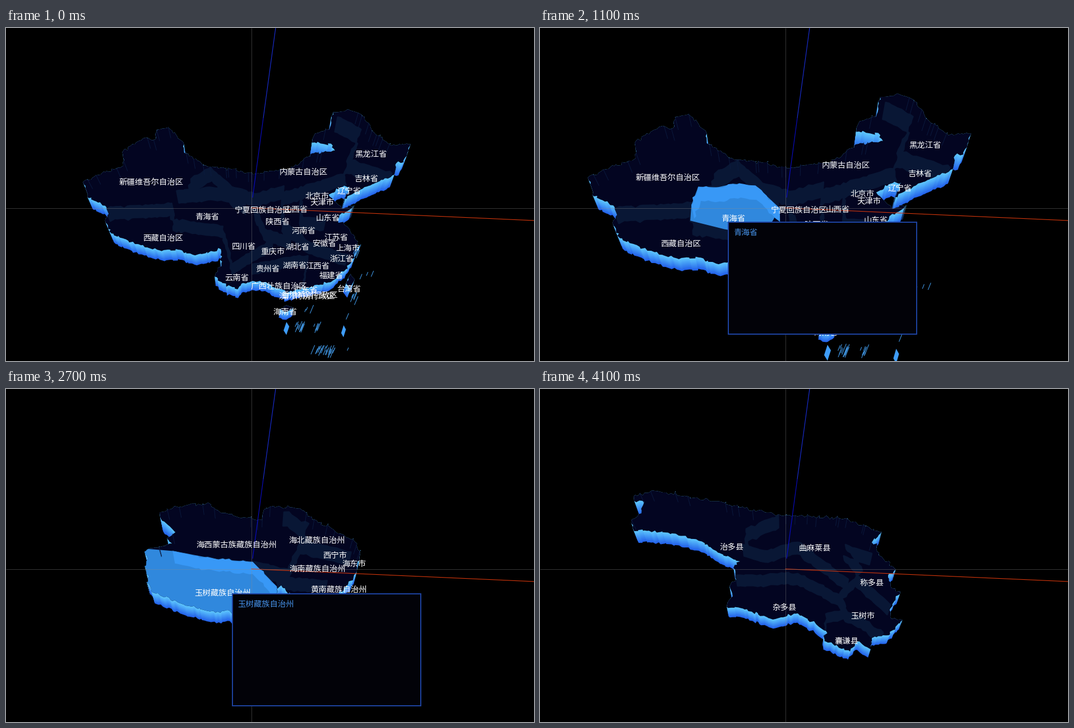
Animation of 942 by 595 pixels, one loop 4800 ms. Source, as a matplotlib script:

```python
import numpy as np
import matplotlib.pyplot as plt
from matplotlib.animation import FuncAnimation
from matplotlib.collections import LineCollection, PolyCollection
from matplotlib.patches import Polygon, Rectangle

W, H, DPI = 942, 595, 100
PX = 72 / DPI
CENTER = np.array([437.5, 321.5])
PERSPECTIVE = 0.0005
FONT = dict(family="Noto Sans CJK JP", fontsize=14.4 * PX, va="baseline")
TOP, BAND = "#030521", "#091735"
HOT, HOT_BAND = "#3088dd", "#3898f6"
WALL_LOW, WALL_HIGH = np.array([.14, .39, .92]), np.array([.38, .80, 1])
LAYERS = 16


def rough(points, amp=1.5, step=4, closed=True):
    """Subdivide a line and jitter it like a coast."""
    pts = np.array(points, float)
    rng = np.random.default_rng(len(pts))
    ends = np.roll(pts, -1, axis=0) if closed else pts[1:]
    out = []
    for a, b in zip(pts, ends):
        n = max(1, int(np.hypot(*(b - a)) / step))
        line = a + np.linspace(0, 1, n, endpoint=False)[:, None] * (b - a)
        line[1:] += rng.normal(0, amp, (n - 1, 2))
        out.extend(line)
    if not closed:
        out.append(pts[-1])
    return np.array(out)


def sink(points, depth):
    """Move points from the top face down to the base."""
    return CENTER + (points - CENTER) * 0.97 + [0, depth]


def band(line, depth):
    line = rough(line, 1.2, 6, closed=False)
    return np.vstack([line, sink(line, depth)[::-1]])


def leaf(x, y, w, h):
    """Slanted diamond used for islands."""
    return np.array([(x - w, y + h * .3), (x, y - h), (x + w, y - h * .3), (x, y + h)])


def north_ticks(outline, depth):
    """Thin wall edges that show along the northern border."""
    rng = np.random.default_rng(4)
    heading = np.roll(outline, -1, axis=0) - outline
    north = outline[(heading[:, 0] > 0) & (outline[:, 1] < 300)]
    picked = north[rng.random(len(north)) < .22]
    return [np.array([p - [0, 1.5], sink(p, depth * .7)]) for p in picked]


def sea_slivers():
    rng = np.random.default_rng(11)
    # x, y, spread, count
    clusters = [(540, 572, 5, 14), (573, 577, 4, 9), (655, 412, 3, 10), (590, 625, 20, 26),
                (652, 508, 4, 5), (656, 512, 1, 1), (675, 466, 8, 3), (637, 549, 1, 1),
                (556, 535, 6, 3)]
    lines = []
    for x, y, spread, count in clusters:
        for _ in range(count):
            px, py = rng.normal((x, y), (spread, 4))
            size = rng.uniform(6, 20)
            lines.append([(px, py + size / 2), (px + size * .4, py - size / 2)])
    return np.array(lines)


def make_map(end, ref, depth, outline, bands, labels, regions, islets=(), slivers=()):
    shape = rough(outline)
    return dict(end=end, ref=ref, depth=depth, shape=shape, labels=labels,
                bands=[band(b, depth) for b in bands],
                ticks=north_ticks(shape, depth),
                regions={name: (np.array(edge + rest, float), band(edge, depth))
                         for name, (edge, rest) in regions.items()},
                islets=[rough(i, .8) for i in islets], slivers=slivers)


XJ, QH = "新疆维吾尔自治区", "青海省"
HX, XN, YS = "海西蒙古族藏族自治州", "西宁市", "玉树藏族自治州"
ZD = "杂多县"

north = [(89, 268), (116, 254), (173, 234), (174, 203), (215, 178), (240, 180), (243, 162),
         (267, 156), (297, 185), (299, 207), (347, 236), (380, 238), (440, 251), (519, 240),
         (562, 209), (610, 203), (602, 189), (563, 187), (569, 168), (598, 160), (605, 125),
         (640, 121), (664, 130), (690, 166), (726, 193), (766, 190), (752, 227)]
east = [(737, 229), (733, 253), (684, 275), (630, 301), (642, 277), (630, 275), (598, 294),
        (625, 322), (653, 316), (614, 345), (637, 360), (660, 391), (654, 426), (632, 455),
        (604, 478), (516, 499), (487, 489), (456, 475)]
west = [(417, 481), (409, 493), (376, 478), (360, 466), (375, 437), (374, 408), (320, 421),
        (285, 409), (250, 412), (215, 404), (146, 375), (133, 348), (141, 334), (134, 317),
        (100, 301)]
COUNTRY = make_map(
    5.5, .989, 24, north + east + west,
    bands=[[(135, 325), (150, 320), (272, 313)],
           [(272, 312), (270, 345), (378, 360), (396, 440), (482, 388)],
           [(283, 286), (345, 279), (385, 283), (425, 310)],
           [(308, 275), (320, 255), (354, 238), (397, 278), (450, 292), (505, 276)],
           [(505, 290), (640, 248), (635, 225), (663, 160), (615, 135)],
           [(640, 222), (728, 250)],
           [(440, 300), (465, 365), (520, 384)],
           [(502, 296), (506, 350), (562, 395), (640, 420)],
           [(540, 305), (546, 342), (592, 344)],
           [(440, 440), (500, 428), (556, 422), (550, 472)]],
    labels=[(XJ, 230, 267), ("西藏自治区", 253, 384), (QH, 346, 339),
            ("宁夏回族自治区", 462, 325), ("内蒙古自治区", 545, 246), ("黑龙江省", 684, 209),
            ("吉林省", 675, 260), ("辽宁省", 640, 286), ("北京市", 574, 296),
            ("天津市", 585, 308), ("山西省", 530, 324), ("陕西省", 493, 350),
            ("山东省", 597, 342), ("河南省", 547, 368), ("江苏省", 615, 382),
            ("安徽省", 590, 395), ("上海市", 640, 405), ("浙江省", 627, 427),
            ("湖北省", 534, 402), ("重庆市", 483, 411), ("四川省", 422, 401),
            ("贵州省", 472, 449), ("湖南省", 529, 441), ("江西省", 577, 443),
            ("福建省", 605, 463), ("云南省", 407, 468), ("广西壮族自治区", 496, 485),
            ("广东省", 553, 493), ("香港特别行政区", 561, 505),
            ("澳门特别行政区", 555, 507), ("台湾省", 643, 492), ("海南省", 509, 541)],
    regions={XJ: ([(272, 313), (286, 286)],
                  [(308, 278), (354, 232), (340, 150), (60, 150), (80, 300), (135, 328)]),
             QH: ([(272, 316), (284, 284), (318, 285), (345, 279), (385, 282), (428, 322)],
                  [(415, 345), (378, 368), (330, 359), (270, 344)])},
    islets=[leaf(512, 534, 15, 7), leaf(646, 476, 9, 16)], slivers=sea_slivers())
DIAMONDS = [leaf(512, 577, 6, 14), leaf(633, 583, 5, 13)]

PROVINCE = make_map(
    25, .98, 21,
    [(277, 222), (300, 215), (362, 205), (384, 223), (412, 230), (456, 236), (463, 212),
     (522, 215), (548, 235), (618, 273), (628, 295), (618, 332), (568, 396), (546, 391),
     (512, 372), (490, 350), (482, 357), (490, 396), (473, 416), (420, 420), (399, 394),
     (375, 398), (320, 384), (266, 363), (254, 345), (259, 334), (251, 317), (257, 304),
     (251, 291), (270, 284), (299, 277), (290, 268), (305, 257), (288, 241), (279, 233)],
    bands=[[(300, 290), (380, 305), (440, 309), (502, 322)],
           [(256, 318), (320, 330), (345, 366)],
           [(495, 222), (538, 242), (503, 318)],
           [(525, 272), (612, 292)],
           [(484, 350), (465, 334), (570, 342)]],
    labels=[(HX, 412, 278), ("海北藏族自治州", 552, 271), (XN, 584, 297),
            ("海东市", 617, 312), ("海南藏族自治州", 553, 321), ("黄南藏族自治州", 590, 356),
            ("果洛藏族自治州", 533, 372), (YS, 388, 363)],
    regions={HX: ([(463, 211), (495, 222), (538, 245)],
                  [(502, 320), (440, 309), (380, 304), (300, 290), (270, 270), (270, 200),
                   (400, 200), (456, 230)]),
             XN: ([(575, 267), (590, 262), (604, 272)], [(598, 292), (580, 290)]),
             YS: ([(300, 290), (380, 305), (440, 309), (482, 352)],
                  [(495, 396), (440, 440), (240, 380), (240, 285)])})

COUNTY = make_map(
    40.6, 1, 19,
    [(167, 192), (205, 182), (263, 192), (425, 224), (545, 231), (610, 255), (592, 274),
     (610, 300), (635, 323), (621, 333), (628, 356), (643, 361), (624, 396), (628, 411),
     (647, 413), (622, 440), (592, 445), (590, 465), (567, 451), (553, 469), (507, 450),
     (510, 432), (460, 401), (420, 411), (365, 394), (333, 389), (343, 365), (338, 352),
     (350, 340), (345, 320), (357, 308), (320, 293), (275, 268), (235, 258), (205, 253),
     (168, 254), (163, 235), (181, 222), (186, 202), (168, 200)],
    bands=[[(366, 268), (368, 250), (425, 226)],
           [(362, 278), (400, 289), (460, 274), (550, 340)],
           [(592, 294), (545, 278), (575, 325), (535, 365)],
           [(350, 333), (460, 330), (535, 368), (545, 388)],
           [(568, 335), (625, 386)],
           [(510, 425), (510, 402), (545, 393), (612, 435)]],
    labels=[("治多县", 342, 282), ("曲麻莱县", 490, 284), ("称多县", 592, 346),
            ("玉树市", 576, 405), (ZD, 436, 390), ("囊谦县", 547, 450)],
    regions={ZD: ([(345, 334), (400, 336), (460, 330), (535, 368)],
                  [(512, 435), (325, 400), (325, 340)])})

# first frame, hovered region, tooltip corner
HOVERS = [(0, None, 0, 0), (7, XJ, 262, 290), (8, QH, 383, 384), (10, QH, 355, 362),
          (11, QH, 335, 346), (17, HX, 400, 318), (18, HX, 458, 290), (19, HX, 499, 272),
          (20, HX, 535, 282), (21, XN, 569, 296), (23, XN, 568, 298), (25, YS, 480, 350),
          (26, YS, 403, 365), (28, None, 0, 0), (32, ZD, 441, 357), (34, None, 0, 0)]

fig = plt.figure(figsize=(W / DPI, H / DPI), dpi=DPI, facecolor="black")
ax = fig.add_axes([0, 0, 1, 1])


def fill(polys, colors, clip=None, edge=0):
    item = PolyCollection(polys, facecolors=colors, linewidths=edge,
                          edgecolors=colors if edge else "none")
    ax.add_collection(item, autolim=False)
    if clip is not None:
        item.set_clip_path(clip)


def strokes(lines, color, width):
    ax.add_collection(LineCollection(lines, colors=color, linewidths=width * PX), autolim=False)


def draw_map(m, frame, region):
    u = np.clip(1 + (frame - m["end"]) / 10, 0, 1)
    scale = (1 - .5 * (1 - u) ** 2) / m["ref"]

    def project(points):
        rel = np.asarray(points, float) - CENTER
        return CENTER + scale * rel / (1 + (1 - scale) * PERSPECTIVE * rel[..., 1:])

    solids = [m["shape"], *m["islets"]]
    walls, shades = [], []
    for q in np.linspace(0, 1, LAYERS):
        for s in solids:
            walls.append(project(s + (sink(s, m["depth"]) - s) * (1 - q)))
            shades.append(WALL_LOW + (WALL_HIGH - WALL_LOW) * q)
    fill(walls, shades)
    if len(m["slivers"]):
        strokes(list(project(m["slivers"])), "#3f93de", 1.1)
        fill([project(d) for d in DIAMONDS], "#3f9df8")
        fill([project(s) for s in m["islets"]], TOP)
    top = ax.add_patch(Polygon(project(m["shape"]), facecolor=TOP, lw=0))
    fill([project(b) for b in m["bands"]], BAND, top, 2)
    strokes([project(t) for t in m["ticks"]], "#0b1b3f", .9)
    dots = project([t[0] for t in m["ticks"]])
    ax.scatter(dots[::2, 0], dots[::2, 1], s=.8, color="#5aa9dd", lw=0)
    if region in m["regions"]:
        area, edge = m["regions"][region]
        fill([project(area)], HOT, top)
        fill([project(edge)], HOT_BAND, top)
    for name, x, y in m["labels"]:
        tx, ty = project([x, y])
        ax.text(tx, ty + 5.3, name, color="white", ha="center", zorder=4, **FONT)


def draw(frame):
    ax.clear()
    ax.set(xlim=(0, W), ylim=(H, 0))
    ax.axis("off")
    _, region, x, y = [h for h in HOVERS if h[0] <= frame][-1]
    current = COUNTRY if frame < 16 else PROVINCE if frame < 32 else COUNTY

    strokes([[CENTER, (W, 344)]], "#d8380c", 1.1)
    draw_map(current, frame, region)
    cx, cy = CENTER
    strokes([[(0, cy), (W, cy)], [(cx, 0), (cx, H)]], (.55, .55, .55, .38), 1)
    strokes([[(481, 0), (459, 161)]], "#1a2fdc", 1.1)
    strokes([[(459, 161), (440, 303)]], "#0a0ccc", 1.1)
    if region:
        ax.add_patch(Rectangle((x + 1, y + 1), 336, 200, facecolor="#020208",
                               edgecolor="#1d429f", lw=2 * PX, zorder=5))
        ax.text(x + 10.5, y + 24.3, region, color="#4590e6", zorder=6, **FONT)
    return []


anim = FuncAnimation(fig, draw, frames=48, interval=100, init_func=lambda: [],
                     repeat=True, repeat_delay=0)
plt.show()
```
